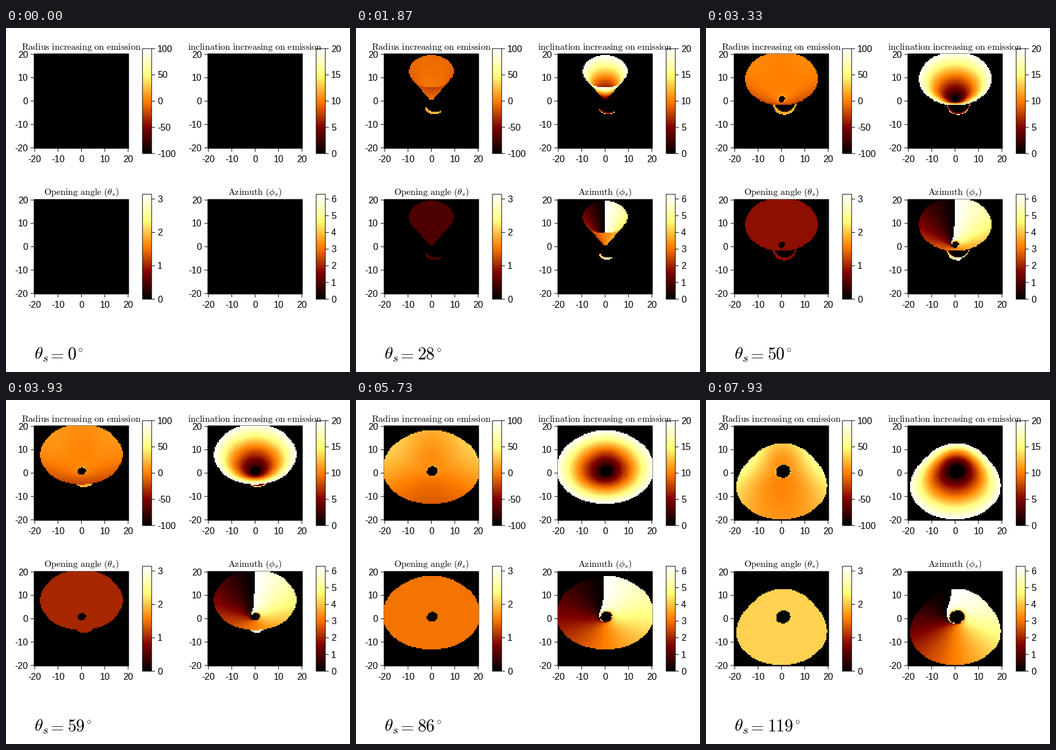
Write a matplotlib script that moves like this. It is 600 px wide and 600 px high and loops after 8000 ms.

```python
from functools import lru_cache

import numpy as np
import matplotlib.pyplot as plt
from matplotlib.animation import FuncAnimation
from matplotlib.collections import LineCollection

plt.rcParams["mathtext.fontset"] = "cm"
plt.rcParams["font.family"] = "Liberation Sans"

SIZE, DPI = 600, 100
FRAMES, INTERVAL = 200, 40
PT = 72 / DPI

# Light rays around a spinning black hole, traced back from the viewer
SPIN, TILT = 0.99, np.radians(45)
R_MAX, RES, STEPS = 20, 80, 320
U_HORIZON = 1 / (1 + np.sqrt(1 - SPIN**2))
U_EDGE = 1 / R_MAX
U_START = 1e-3

axis = np.linspace(-20, 20, RES)
alpha, beta = (m.ravel() for m in np.meshgrid(axis, axis))
impact = np.hypot(alpha, beta)
step = 8 / STEPS / np.sqrt(impact**2 + 4)
pix = np.arange(alpha.size)

lam = -alpha * np.sin(TILT)
eta = beta**2 + (alpha**2 - SPIN**2) * np.cos(TILT)**2
ltot = eta + lam**2
viewer = np.array([-np.sin(TILT), 0, np.cos(TILT)])


def rates(s):
    """Mino-time derivatives of (direction, its speed, 1/r, its speed, drag, delay)."""
    n, v, w = s[:3], s[3:6], s[7]
    u, z2 = np.clip(s[6], U_START, 1), n[2]**2
    a2 = SPIN**2
    out = np.empty_like(s)
    out[:3] = v
    out[3:6] = -(ltot + 2 * a2 * z2) * n
    out[5] += a2 * n[2]
    out[6] = w
    out[7] = ((a2 - ltot) * u + 3 * (eta + (lam - SPIN)**2) * u**2
              - 2 * a2 * eta * u**3)
    d = np.maximum(1 - 2 * u + a2 * u**2, 1e-3)
    out[8] = -SPIN * (2 * u - SPIN * lam * u**2) / d
    k = 1 + a2 * u**2
    out[9] = (k * (k - SPIN * lam * u**2) / (u**2 * d)
              + SPIN * (lam - SPIN * (1 - z2)) - w / u**2 - 2 * w / u)
    return out


def trace():
    s = np.zeros((10, alpha.size))
    side = np.array([beta * np.cos(TILT), -alpha, beta * np.sin(TILT)]) / impact
    turn = impact * U_START
    s[:3] = viewer[:, None] * np.cos(turn) + side * np.sin(turn)
    s[3:6] = impact * (side * np.cos(turn) - viewer[:, None] * np.sin(turn))
    s[6], s[7] = U_START, 1
    keep = [0, 1, 2, 6, 8, 9]
    path = np.empty((STEPS + 1, len(keep), alpha.size), np.float32)
    path[0] = s[keep]
    for i in range(STEPS):
        alive = (s[6] < U_HORIZON) & ((s[7] > 0) | (s[6] > 0.03))
        h = step * alive
        k1 = rates(s)
        k2 = rates(s + k1 * h / 2)
        k3 = rates(s + k2 * h / 2)
        k4 = rates(s + k3 * h)
        s = s + (k1 + 2 * k2 + 2 * k3 + k4) * h / 6
        path[i + 1] = s[keep]
    return path


path = trace()
height = np.ascontiguousarray(path[:, 2].T)


@lru_cache(maxsize=None)
def cone_maps(deg):
    """Delay, radius, opening angle and azimuth where rays first meet the cone."""
    theta = np.radians(deg)
    c = np.float32(np.cos(theta))
    above = height > c
    cut = above[:, 1:] != above[:, :-1]
    maps = np.zeros((4, alpha.size))
    maps[0] = -100
    done = np.zeros(alpha.size, bool)
    for _ in range(2):
        k = cut.argmax(1)
        hit = cut[pix, k]
        cut[pix, k] = False
        p, q = path[k, :, pix], path[k + 1, :, pix]
        gap = np.where(hit, q[:, 2] - p[:, 2], 1)
        f = np.where(hit, (c - p[:, 2]) / gap, 0)
        x, y, z, u, drag, delay = (p + (q - p) * f[:, None]).T
        ok = hit & ~done & (u > U_EDGE) & (u < U_HORIZON)
        u = np.where(ok, u, 1)
        r = 1 / u
        cos_psi = viewer[0] * x + viewer[2] * z
        side = np.where(beta < 0, 1, 0.2 + 0.8 * (alpha / impact)**2)
        direct = k * step * impact < 3.3
        delay = delay - r + 2 * np.log(u) + 1.4 * r * (1 - cos_psi) * side * direct
        azimuth = (np.arctan2(y, x) + drag) % (2 * np.pi)
        for m, val in zip(maps, (delay, r, np.full_like(r, theta), azimuth)):
            m[ok] = val[ok]
        done |= ok
    return maps.reshape(4, RES, RES)


fig = plt.figure(figsize=(SIZE / DPI, SIZE / DPI), dpi=DPI, facecolor="white")
ax = fig.add_axes([0, 0, 1, 1])
ax.axis("off")

HALF, BAR_HALF = 82.5, 91.5
UNIT = HALF / (20 + 20 / (RES - 1))
frames, ticks_bars = [], []


def label(x, y, text, size=16, ha="left"):
    return ax.text(x, y, text, fontsize=size * PT, ha=ha, va="baseline", color="black")


def picture(data, left, right, bottom, top, lo, hi, edges):
    edges.append([(left, top), (right, top), (right, bottom), (left, bottom), (left, top)])
    return ax.imshow(data, cmap="afmhot", vmin=lo, vmax=hi, origin="lower",
                     extent=(left, right, bottom, top), aspect="auto",
                     interpolation="nearest", zorder=2)


def panel(cx, cy, title, base, lo, hi, ticks):
    left, right, top, bottom = cx - HALF, cx + HALF, cy - HALF, cy + HALF
    im = picture(np.full((RES, RES), lo), left, right, bottom, top, lo, hi, frames)
    for v in range(-20, 21, 10):
        x, y = cx + v * UNIT, cy - v * UNIT
        ticks_bars.append([(x, bottom), (x, bottom + 6)])
        ticks_bars.append([(left - 6, y), (left, y)])
        label(x, bottom + 24.5, str(v), ha="center")
        label(left - 10.5, y + 5.7, str(v), ha="right")
    bar_left, bar_right = cx + 106.5, cx + 122.5
    bar_bottom = cy + BAR_HALF
    ramp = np.linspace(lo, hi, 256)[:, None]
    picture(ramp, bar_left, bar_right, bar_bottom, cy - BAR_HALF, lo, hi, ticks_bars)
    for v in ticks:
        y = bar_bottom - (v - lo) / (hi - lo) * 2 * BAR_HALF
        ticks_bars.append([(bar_right, y), (bar_right + 6, y)])
        label(bar_right + 10, y + 5.7, str(v))
    label(cx, base, title, ha="center")
    return im


images = [
    panel(131.5, 127.5, r"$\mathrm{Radius\ increasing\ on\ emission}$", 38,
          -100, 100, range(-100, 101, 50)),
    panel(434.5, 127.5, r"$\mathrm{inclination\ increasing\ on\ emission}$", 38,
          0, 20, range(0, 21, 5)),
    panel(131.5, 381.5, r"$\mathrm{Opening\ angle\ (}\theta_s\mathrm{)}$", 291,
          0, np.pi, range(4)),
    panel(434.5, 381.5, r"$\mathrm{Azimuth\ (}\phi_s\mathrm{)}$", 291,
          0, 2 * np.pi, range(7)),
]
for group, z in ((frames, 1), (ticks_bars, 3)):
    ax.add_collection(LineCollection(group, colors="black", linewidths=PT,
                                     snap=False, zorder=z))
ax.set_xlim(0, SIZE)
ax.set_ylim(SIZE, 0)

label(49, 578, r"$\theta_s$", 30)
label(71.5, 578, r"$=$", 30)
number = label(107, 578, "", 30)
degree = label(107, 565, r"$\circ$", 16)


def update(i):
    deg = (3 * i + 2) // 5
    for im, data in zip(images, cone_maps(deg)):
        im.set_data(data)
    number.set_text(rf"$\mathrm{{{deg}}}$")
    degree.set_x(110 + 15 * len(str(deg)))
    return [*images, number, degree]


anim = FuncAnimation(fig, update, frames=FRAMES, interval=INTERVAL,
                     repeat=True, repeat_delay=0, blit=False)
plt.show()
```
